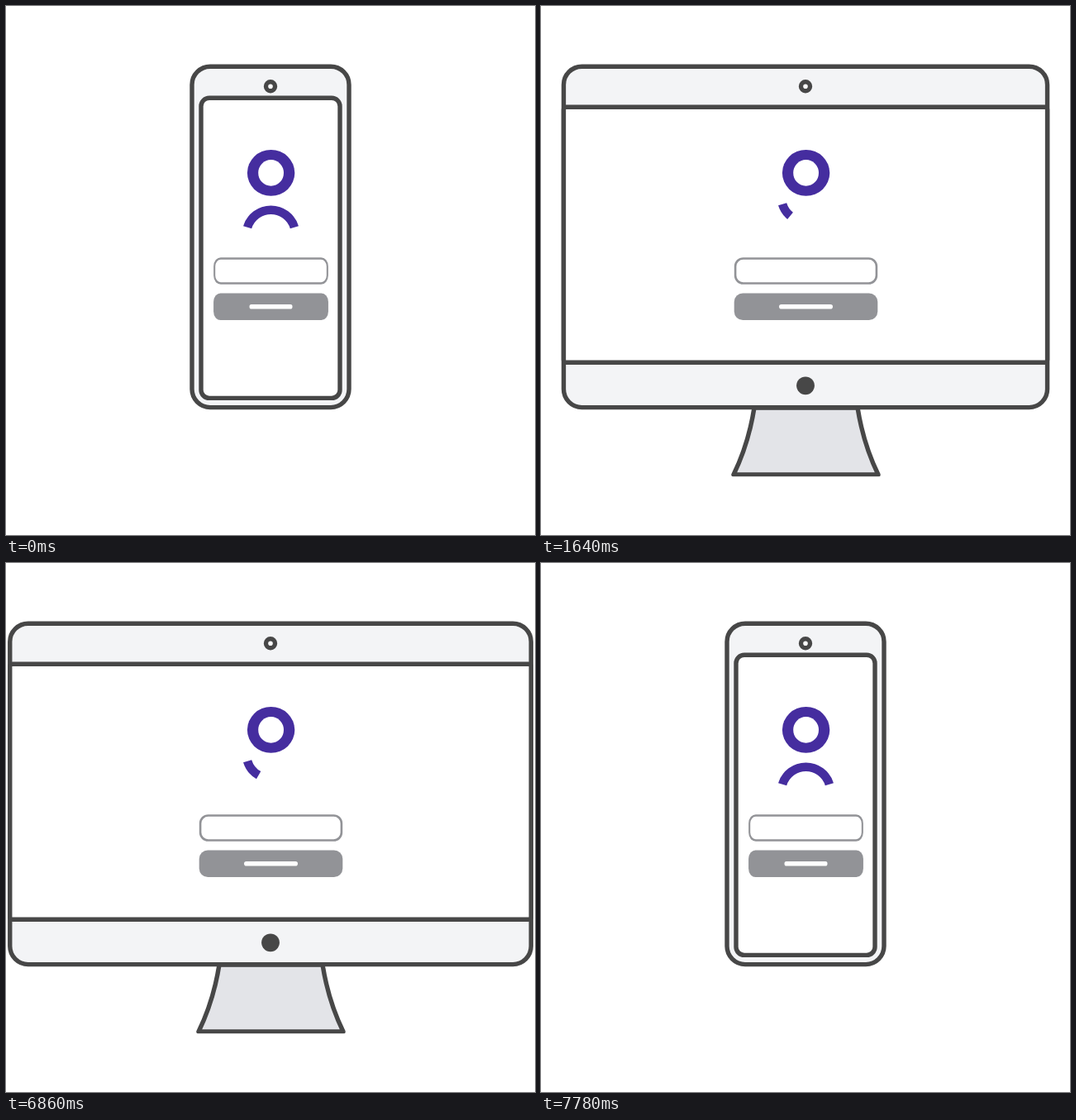
These frames come from a looping animation (640 by 640 pixels, 8000 ms). An HTML page:

```html
<!DOCTYPE html>
<html lang="en">
<head>
<meta charset="utf-8">
<title>Sign-in on every device</title>
<style>
  html, body { margin: 0; width: 100%; height: 100%; overflow: hidden; background: #fff; }
  svg { display: block; width: 100vw; height: 100vh; }
  .line { stroke: #474747; stroke-width: 5.4; stroke-linejoin: round; }
  .arc { fill: none; stroke: #452d9f; stroke-width: 10.6; }
</style>
</head>
<body>
<svg viewBox="0 0 640 640">
  <defs><clipPath id="floor"><rect width="640" height="569.3"/></clipPath></defs>
  <g clip-path="url(#floor)">
    <path id="stand" class="line" fill="#e3e4e8"
      d="M258 486Q251 530 233 567H408Q390 530 383 486Z"/>
  </g>
  <rect id="body" class="line" fill="#f3f4f6" y="73.2" height="412.4" rx="22"/>
  <circle id="dot" cx="320" cy="459.3" fill="#474747"/>
  <rect id="screen" class="line" fill="#fff"/>
  <circle class="line" cx="320" cy="97.2" r="5.5" fill="#fff"/>
  <ellipse cx="320.6" cy="201.9" rx="28.7" ry="27.9" fill="#452d9f"/>
  <ellipse cx="320.6" cy="201.9" rx="15.4" ry="15.8" fill="#fff"/>
  <path id="shoulders" class="arc"/>
  <path id="smile" class="arc"/>
  <g id="form">
    <rect x="-85.4" y="305.5" width="170.8" height="30" rx="9.5" fill="#fff" stroke="#929397" stroke-width="2.6"/>
    <rect x="-86.8" y="347.5" width="173.6" height="32.5" rx="10.5" fill="#929397"/>
    <rect x="-32.5" y="361" width="65" height="5.6" rx="2.8" fill="#fff"/>
  </g>
</svg>
<script>
const LOOP = 8000, STEP = 1000 / 14;
const GROW = 500, SHRINK = 6500, SHRUNK = 7662;
const PEAK = 788, SETTLED = 1230, OVERSHOOT = .13;

const set = (id, attrs) => {
  const node = document.getElementById(id);
  for (const k in attrs) node.setAttribute(k, attrs[k]);
};

const part = (t, from, to) => Math.min(1, Math.max(0, (t - from) / (to - from)));
const easeIn = (u, n) => Math.pow(u, n);
const easeOut = (u, n) => 1 - Math.pow(1 - u, n);
const smooth = u => u * u * (3 - 2 * u);
const mix = (a, b, u) => a + (b - a) * u;

// Device growth, 0 phone to 1 desktop: speeds up past 1, then settles back
function growth(age) {
  return age < PEAK
    ? (1 + OVERSHOOT) * easeIn(part(age, 0, PEAK), 2.75)
    : 1 + OVERSHOOT * (1 - smooth(part(age, PEAK, SETTLED)));
}

function drawDevice(age) {
  const q = growth(age), k = Math.min(1, q);
  const half = mix(95, 290, q);
  const inner = half - 11 * Math.pow(1 - k, .85);
  const top = mix(130.2, 122.2, k) - 19 * (1 - part(k, 0, .17));
  const bottom = mix(474.4, 431.3, Math.pow(k, .62));

  set("body", { x: 320 - half, width: 2 * half });
  set("screen", { x: 320 - inner, width: 2 * inner, y: top, height: bottom - top, rx: mix(10, 3, k) });
  set("dot", { r: 10.9 * Math.pow(k, 1.45) });
  // The stand slides out from behind the body
  set("stand", { transform: `translate(0 ${-760 * easeIn(1 - part(age, 0, 800), 2)})` });
}

// Arc between two shares of its length; dir -1 bulges up, 1 down
function arc(cy, dir, from, to) {
  if (to - from < .002) return "";
  const R = 29.7, SPAN = 146 * Math.PI / 180;
  const point = s => {
    const a = (s - .5) * SPAN;
    return (320.5 + R * Math.sin(a)).toFixed(2) + " " + (cy + dir * R * Math.cos(a)).toFixed(2);
  };
  return `M${point(from)}A${R} ${R} 0 0 ${dir < 0 ? 1 : 0} ${point(to)}`;
}

function render(time) {
  const t = Math.floor(time / STEP + .09) * STEP;
  const back = t > SHRINK - 10;
  drawDevice(back ? SHRUNK - t : t - GROW);

  const size = back
    ? 1 - easeOut(part(t, 6965, 7786), 3)
    : easeOut(part(t, GROW, 1260), 1.2);
  const hidden = back
    ? 1 - easeOut(part(t, 6925, 7786), 3)
    : easeIn(part(t, GROW, 1000), 2);
  const smile = back
    ? 1 - easeIn(part(t, SHRINK, 6925), 2)
    : easeIn(part(t, 920, 2857), 1.5);

  set("form", { transform: `translate(320.5 0) scale(${mix(.8, 1, size)} 1)` });
  set("shoulders", { d: arc(276.4, -1, hidden, 1) });
  set("smile", { d: arc(231, 1, 0, smile) });
}

function tick() {
  render(performance.now() % LOOP);
  requestAnimationFrame(tick);
}
tick();
</script>
</body>
</html>
```
